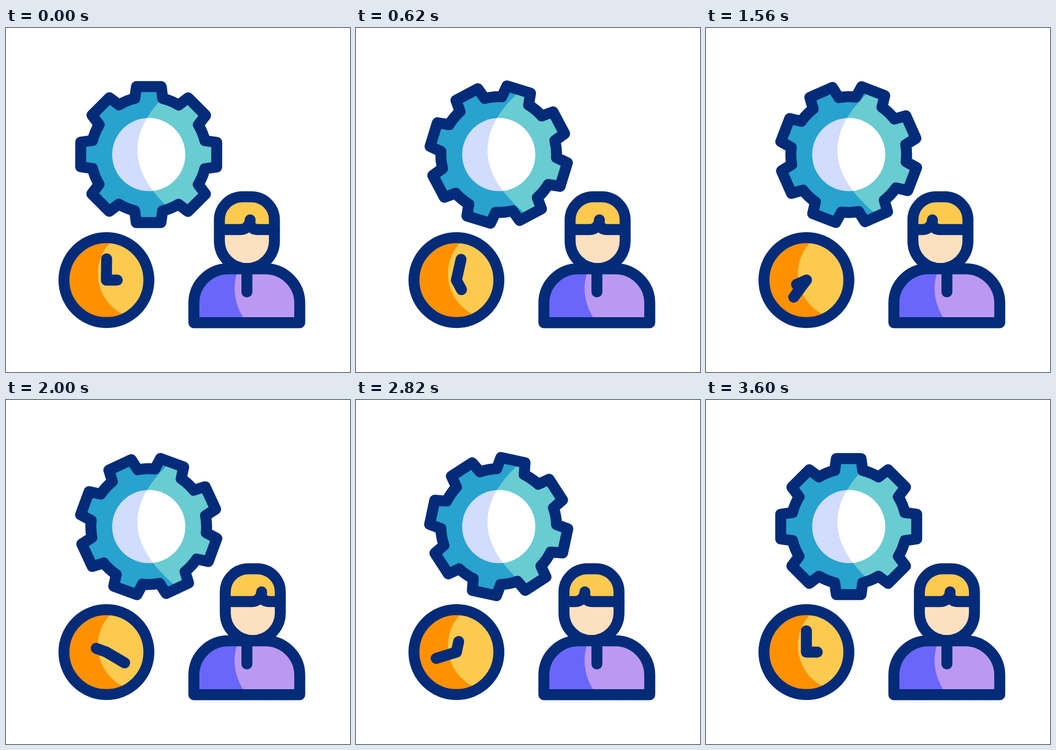
Write an HTML page that moves like this. It is 640x640 px and loops after 3620 ms.

```html
<!DOCTYPE html>
<html lang="en">
<head>
<meta charset="utf-8">
<style>
  html, body { margin: 0; height: 100%; overflow: hidden; background: #fff; }
  svg { display: block; width: 100vw; height: 100vh; }
  .line { fill: none; stroke: #032b78; stroke-width: 20.4; stroke-linecap: round; stroke-linejoin: round; }
</style>
</head>
<body>
<svg viewBox="0 0 640 640">
  <defs>
    <path id="gear"/>
    <path id="gearLight" d="M329 97Q160 227 329 357H420V97Z"/>
    <path id="torso" d="M349.5 548.3V512A64 64 0 0 1 413.5 448H482.5A64 64 0 0 1 546.5 512V548.3Z"/>
    <clipPath id="gearClip"><use href="#gear"/></clipPath>
    <clipPath id="holeClip"><circle cx="265.5" cy="235.5" r="68"/></clipPath>
    <clipPath id="clockClip"><circle cx="186.8" cy="469" r="79"/></clipPath>
    <clipPath id="torsoClip"><use href="#torso"/></clipPath>
  </defs>

  <g clip-path="url(#gearClip)">
    <rect x="120" y="90" width="292" height="292" fill="#28a2ce"/>
    <use href="#gearLight" fill="#68ccd1"/>
  </g>
  <g clip-path="url(#holeClip)">
    <rect x="190" y="160" width="150" height="150" fill="#d2dcfd"/>
    <use href="#gearLight" fill="#fff"/>
  </g>
  <use href="#gear" class="line"/>

  <g clip-path="url(#clockClip)">
    <circle cx="186.8" cy="469" r="79" fill="#ff9100"/>
    <circle cx="256" cy="457" r="85" fill="#fdca50"/>
  </g>
  <circle cx="186.8" cy="469" r="79" class="line"/>
  <path id="minute" class="line" d="M186.8 469V429.5"/>
  <path id="hour" class="line" d="M186.8 469H207"/>

  <g id="head">
    <path fill="#fde0bf" d="M397 375V396.3A51.2 51.2 0 0 0 499.4 396.3V375Z"/>
    <path fill="#fdca50" d="M397 375V357A43 43 0 0 1 440 314H456.4A43 43 0 0 1 499.4 357V375Z"/>
    <path id="fringe" class="line"/>
    <path class="line" d="M397 357A43 43 0 0 1 440 314H456.4A43 43 0 0 1 499.4 357V396.3A51.2 51.2 0 0 1 397 396.3Z"/>
  </g>

  <g clip-path="url(#torsoClip)">
    <use href="#torso" fill="#6a66f9"/>
    <path fill="#bb99f2" d="M433 448C419 480 424 515 447 548H560V448Z"/>
  </g>
  <use href="#torso" class="line"/>
  <path class="line" d="M448.2 448V491"/>
</svg>
<script>
  const $ = id => document.getElementById(id);
  const LOOP = 3620, END = 3600;

  function gearPath() {
    const at = (r, deg) => {
      const a = deg * Math.PI / 180;
      return `${(265.5 + r * Math.sin(a)).toFixed(2)} ${(235.5 - r * Math.cos(a)).toFixed(2)}`;
    };
    let d = '';
    for (let a = 0; a < 360; a += 45) {
      d += `${a ? 'A107.7 107.7 0 0 1 ' : 'M'}${at(107.7, a - 14)}`
        + `L${at(128.6, a - 10.3)}L${at(128.6, a + 10.3)}L${at(107.7, a + 14)}`;
    }
    return d + `A107.7 107.7 0 0 1 ${at(107.7, -14)}Z`;
  }

  // Rest, then left and right turns of 600 ms each, then back to rest.
  function swing(t, rest, left, right) {
    const mix = (a, b, p) => a + (b - a) * p * p * (3 - 2 * p);
    if (t < 300) return mix(rest, left, t / 300);
    if (t >= 3300) return mix(right, rest, (t - 3300) / 300);
    const turn = (t - 300) / 600, n = Math.floor(turn);
    return n % 2 ? mix(right, left, turn - n) : mix(left, right, turn - n);
  }

  function rotate(id, deg, x, y) {
    $(id).setAttribute('transform', `rotate(${deg} ${x} ${y})`);
  }

  function draw(now) {
    const t = Math.min(now % LOOP, END), turn = t / 10;
    rotate('gear', turn, 265.5, 235.5);
    rotate('hour', turn, 186.8, 469);
    rotate('minute', turn * 6, 186.8, 469);

    $('head').setAttribute('transform', `translate(${swing(t, 0, -12.8, 12.8)})`);
    const x = 448.2 + swing(t, 6, -16, 19);
    $('fringe').setAttribute('d',
      `M397 375H${x - 18}A18 18 0 0 0 ${x} 357M${x} 366Q${x + 4} 375 ${x + 14} 375H499.4`);
  }

  $('gear').setAttribute('d', gearPath());
  const start = performance.now();
  (function tick() {
    draw(performance.now() - start);
    requestAnimationFrame(tick);
  })();
</script>
</body>
</html>
```
